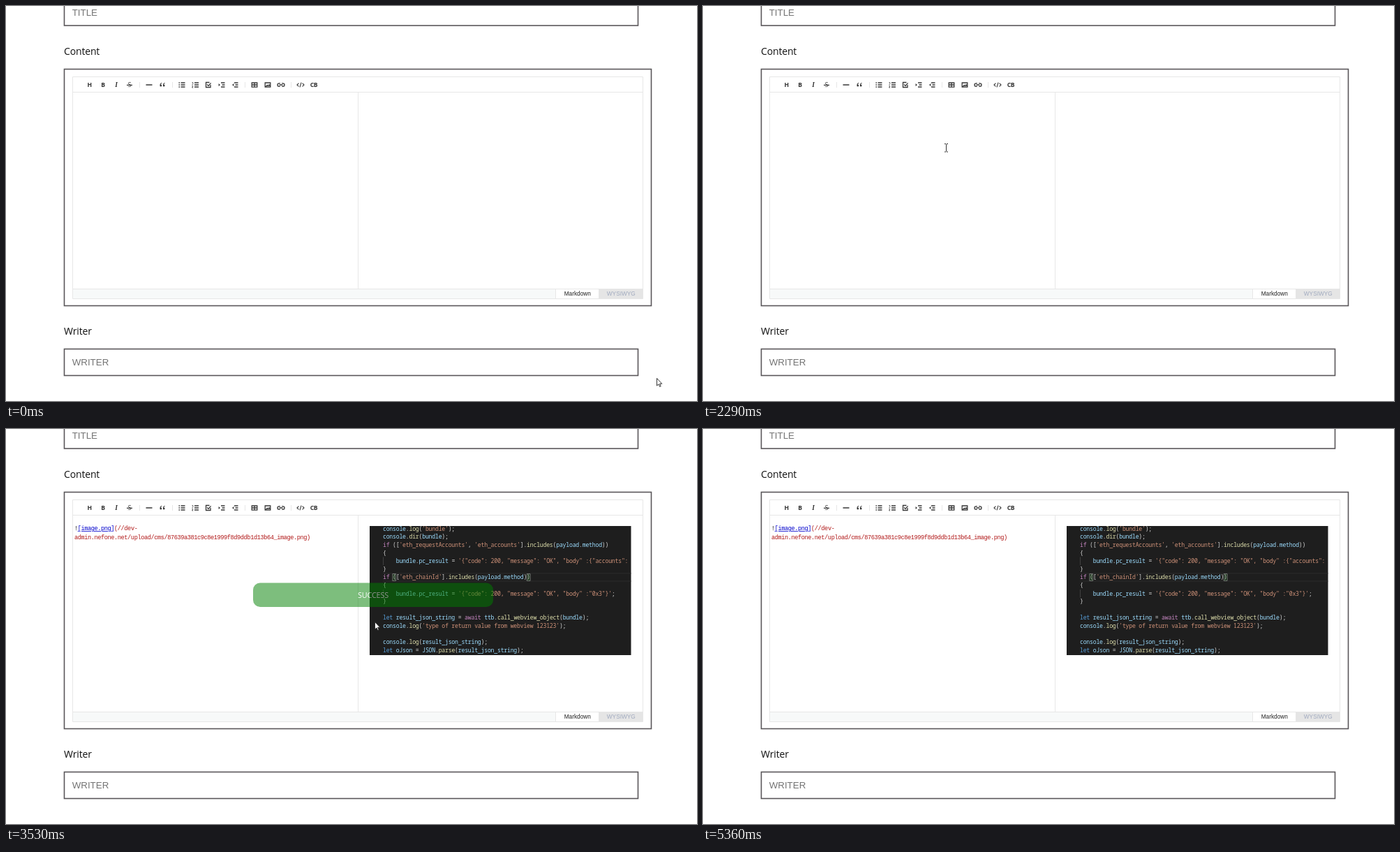
Recreate the animation shown at these times as an HTML page. Size 990 px wide and 566 px high, loop 5670 ms.

```html
<!DOCTYPE html>
<html lang="en">
<head>
<meta charset="utf-8">
<title>Markdown editor upload</title>
<style>
  html, body { margin: 0; width: 100%; height: 100%; overflow: hidden; background: #fff; }
  svg { display: block; width: 990px; height: 566px; }
  text { white-space: pre; }
  .label { font: 14px "Open Sans", sans-serif; letter-spacing: -.15px; fill: #111; }
  .hint { font: 13.33px "Liberation Sans", Arial, sans-serif; fill: #757575; }
  .tab { font: 8.3px "Liberation Sans", Arial, sans-serif; text-anchor: middle; }
  .field { fill: #fff; stroke: #595659; stroke-width: 1.6; }
  .rule { fill: none; stroke: #e7e7e7; }
  .tool { font: 700 8.6px "Open Sans", sans-serif; fill: #333; text-anchor: middle; letter-spacing: -.3px; }
  .icons { fill: none; stroke: #383838; stroke-width: 1.3; }
  .md { font: 8.6px "Liberation Mono", monospace; letter-spacing: -.4px; fill: #b01616; }
  .link { fill: #00c; text-decoration: underline; }
  .code { font: 8.2px "Noto Sans Mono", monospace; letter-spacing: -.23px; fill: #d4d4d4; }
  .toast { font: 10.8px "Open Sans", sans-serif; letter-spacing: -.15px; text-anchor: middle; }
</style>
</head>
<body>
<svg viewBox="0 0 990 566">
  <rect class="field" x="83.5" y="-11" width="822" height="39"/>
  <text class="hint" x="94.7" y="13.7">TITLE</text>
  <text class="label" x="83" y="69.5">Content</text>
  <rect class="field" x="83.5" y="90.5" width="841" height="339"/>
  <text class="label" x="83" y="471">Writer</text>
  <rect class="field" x="83.5" y="491.5" width="822" height="38"/>
  <text class="hint" x="94.7" y="515">WRITER</text>

  <rect x="95" y="405" width="693" height="14" fill="#f7f9f9"/>
  <rect x="850" y="405" width="63" height="14" fill="#e5e5e5"/>
  <path class="rule" d="M95.5 101.5H912.5V419.5H95.5ZM95 123.5H913M504.5 124V405M95 405.5H913M787.5 405V419M849.5 405V419"/>
  <text class="tab" x="818.8" y="415" fill="#222">Markdown</text>
  <text class="tab" x="881.3" y="415" fill="#a0aabf">WYSIWYG</text>

  <path class="rule" d="M191.5 109v8M238.5 109v8M342.5 109v8M408.5 109v8"/>
  <g class="tool">
    <text x="119.6" y="116.2">H</text>
    <text x="139" y="116.2">B</text>
    <text x="158" y="116.4" style="font:italic 700 9.5px 'Liberation Serif',serif">I</text>
    <text x="177" y="116.2" style="font-weight:400">S</text>
    <text x="441" y="116.2">CB</text>
  </g>
  <g class="icons">
    <path d="M173 113.3h8M200.5 113h9"/>
    <path d="M223 110.2q-2 .8-2 3.4M227.4 110.2q-2 .8-2 3.4" stroke-width="1.1"/>
    <path d="M220.6 114h2.4M225 114h2.4" stroke-width="2.6"/>
    <path d="M247.5 110h1.5M247.5 113h1.5M247.5 116h1.5M250.5 110h6M250.5 113h6M250.5 116h6"/>
    <path d="M270 110h6M270 113h6M270 116h6"/>
    <path d="M266.6 109.5h1.2v2.3M266.4 113h1.6M266.4 115h1.6l-1.4 2h1.5" stroke-width=".8"/>
    <path d="M293 113v3.5h-6.5v-7h5M288 112.4l2 2 3.6-4"/>
    <path d="M308 110h5.5M309.5 113h4M308 116h5.5M327 110h5.5M328.5 113h4M327 116h5.5"/>
    <path d="M304.6 111l2.4 2-2.4 2zM326.4 111l-2.4 2 2.4 2z" fill="#383838" stroke="none"/>
    <path d="M352.2 110h7.6v6.2h-7.6zM352 113h8M356 110v6"/>
    <path d="M371.2 110h7.6v6.2h-7.6zM372 116l2.2-2.6 1.4 1.2 1.4-1.8 2 3"/>
    <path d="M393 110.8h-1.8a2.2 2.2 0 0 0 0 4.4h1.8M395 110.8h1.8a2.2 2.2 0 0 1 0 4.4h-1.8M391.6 113h4.8"/>
    <path d="M419.4 110.6l-2.4 2.4 2.4 2.4M424.6 110.6l2.4 2.4-2.4 2.4M423 109.6l-2 6.8" stroke-width="1.1"/>
  </g>

  <g id="markdown" class="md">
    <text x="98" y="145.3"><tspan fill="#222">!</tspan><tspan class="link">[image.png]</tspan>(//dev-</text>
    <text x="98" y="158.3">admin.nefone.net/upload/cms/87639a381c9c8e1999f8d9ddb1d13b64_image.png)</text>
  </g>
  <clipPath id="crop"><rect x="521" y="139" width="374.5" height="185"/></clipPath>
  <g id="preview" clip-path="url(#crop)">
    <rect x="521" y="139" width="375" height="185" fill="#1e1e1e"/>
    <path d="M540 206.9H896M540 218H896" stroke="#2c2c2c"/>
    <path d="M540.5 183.5v11.6M540.5 230v11.6" stroke="#404040"/>
    <path d="M553.8 207.5h4.8v10h-4.8zM746.2 207.5h4.8v10h-4.8z" fill="#163016" stroke="#888" stroke-width=".8"/>
    <g id="code" class="code"></g>
  </g>
  <g id="toast" class="toast">
    <rect x="354" y="220.5" width="344" height="34.5" rx="10" fill="#008000"/>
    <text x="526" y="241.9" fill="#fff">SUCCESS</text>
  </g>
  <rect id="caret" width="1" height="13" fill="#000"/>
  <path id="arrow" d="M.5 .5v10.6l2.5-2.2 1.6 3.6 1.6-.7-1.6-3.5h3.2z" fill="#fff" stroke="#222" stroke-width=".9"/>
  <path id="beam" d="M-2 -5.5H0M1 -5.5H3M.5 -5V5.5M-2 6H0M1 6H3" fill="none" stroke="#333"/>
</svg>
<script>
const LOOP = 5670, UPLOADED = 2680, PREVIEWED = 3530;
const $ = id => document.getElementById(id);
const show = (id, on) => $(id).setAttribute('visibility', on ? 'visible' : 'hidden');
const place = (id, x, y) => $(id).setAttribute('transform', `translate(${x} ${y})`);

// Screen refreshes: single moments, plus bursts of [first, last, count].
const refreshes = [0, 1260, 1810, 2290, UPLOADED, 5360];
for (const [a, b, n] of [[70, 240, 4], [400, 860, 7], [2920, 3460, 8],
                         [PREVIEWED, 4010, 7], [4100, 4650, 8], [4710, 5180, 7]])
  for (let i = 0; i < n; i++) refreshes.push(Math.round(a + (b - a) * i / (n - 1)));
refreshes.sort((a, b) => a - b);

// Pointer path: time, x, y.
const path = [
  [0, 932, 533], [240, 424, 221], [400, 433, 220], [860, 348, 203], [3150, 348, 203],
  [3460, 504, 269], [3530, 528, 276], [4010, 640, 342], [4100, 651, 354], [4710, 905, 566]
];
const caretOn = [[740, 1260], [1810, 2290], [UPLOADED, 3240], [3770, 4300], [4830, 5360]];

const source = `console.log('bundle');
console.dir(bundle);
if (['eth_requestAccounts', 'eth_accounts'].includes(payload.method))
{
    bundle.pc_result = '{"code": 200, "message": "OK", "body" :{"accounts":
}
if (['eth_chainId'].includes(payload.method))
{
    bundle.pc_result = '{"code": 200, "message": "OK", "body" :"0x3"}';
}

let result_json_string = await ttb.call_webview_object(bundle);
console.log('type of return value from webview 123123');

console.log(result_json_string);
let oJson = JSON.parse(result_json_string);`;

function tint(token, called) {
  if (token[0] === "'") return '#ce9178';
  if (token === 'let') return '#569cd6';
  if (token === 'if' || token === 'await') return '#c586c0';
  return called ? '#dcdcaa' : '#9cdcfe';
}

function highlight(line) {
  return line.replace(/'[^']*'?|\w+(\()?/g, (match, paren) => {
    const token = paren ? match.slice(0, -1) : match;
    return `<tspan fill="${tint(token, paren)}">${token}</tspan>${paren || ''}`;
  });
}

$('code').innerHTML = source.split('\n').map((line, i) => {
  const body = line.trimStart(), indent = line.length - body.length;
  return `<text x="${540 + indent * 4.69}" y="${145.7 + i * 11.6}">${highlight(body)}</text>`;
}).join('');

function pointerAt(t) {
  const i = path.findIndex(p => p[0] > t);
  if (i < 0) return null;
  const [t0, x0, y0] = path[i - 1], [t1, x1, y1] = path[i];
  const k = (t - t0) / (t1 - t0);
  return [Math.round(x0 + (x1 - x0) * k), Math.round(y0 + (y1 - y0) * k)];
}

// CSS "ease" curve, solved by bisection.
function ease(u) {
  let lo = 0, hi = 1;
  for (let i = 0; i < 20; i++) {
    const s = (lo + hi) / 2;
    if (.75 * s * (1 - s) + s ** 3 < u) lo = s; else hi = s;
  }
  return .3 * lo * (1 - lo) ** 2 + 3 * lo * lo * (1 - lo) + lo ** 3;
}

const inside = (x, y, l, t, r, b) => x > l && x < r && y > t && y < b;

function render(t) {
  const uploaded = t >= UPLOADED;
  show('markdown', uploaded);
  show('preview', t >= PREVIEWED);
  show('toast', uploaded && t < 5300);
  $('toast').setAttribute('opacity', 1 - ease(Math.min(1, Math.max(0, (t - 2660) / 3000))));

  show('caret', caretOn.some(([a, b]) => t >= a && t < b));
  place('caret', uploaded ? 436 : 98, uploaded ? 149 : 136);

  const pos = pointerAt(t);
  const typing = pos && (inside(...pos, 95, 124, 505, 405) || inside(...pos, 83, 491, 905, 529));
  show('beam', pos && typing);
  show('arrow', pos && !typing);
  if (pos) place(typing ? 'beam' : 'arrow', ...pos);
}

const start = performance.now();
let shown = -1;
function tick() {
  const t = (performance.now() - start) % LOOP;
  const now = refreshes.filter(r => r <= t).pop();
  if (now !== shown) render(shown = now);
  requestAnimationFrame(tick);
}
tick();
</script>
</body>
</html>
```
